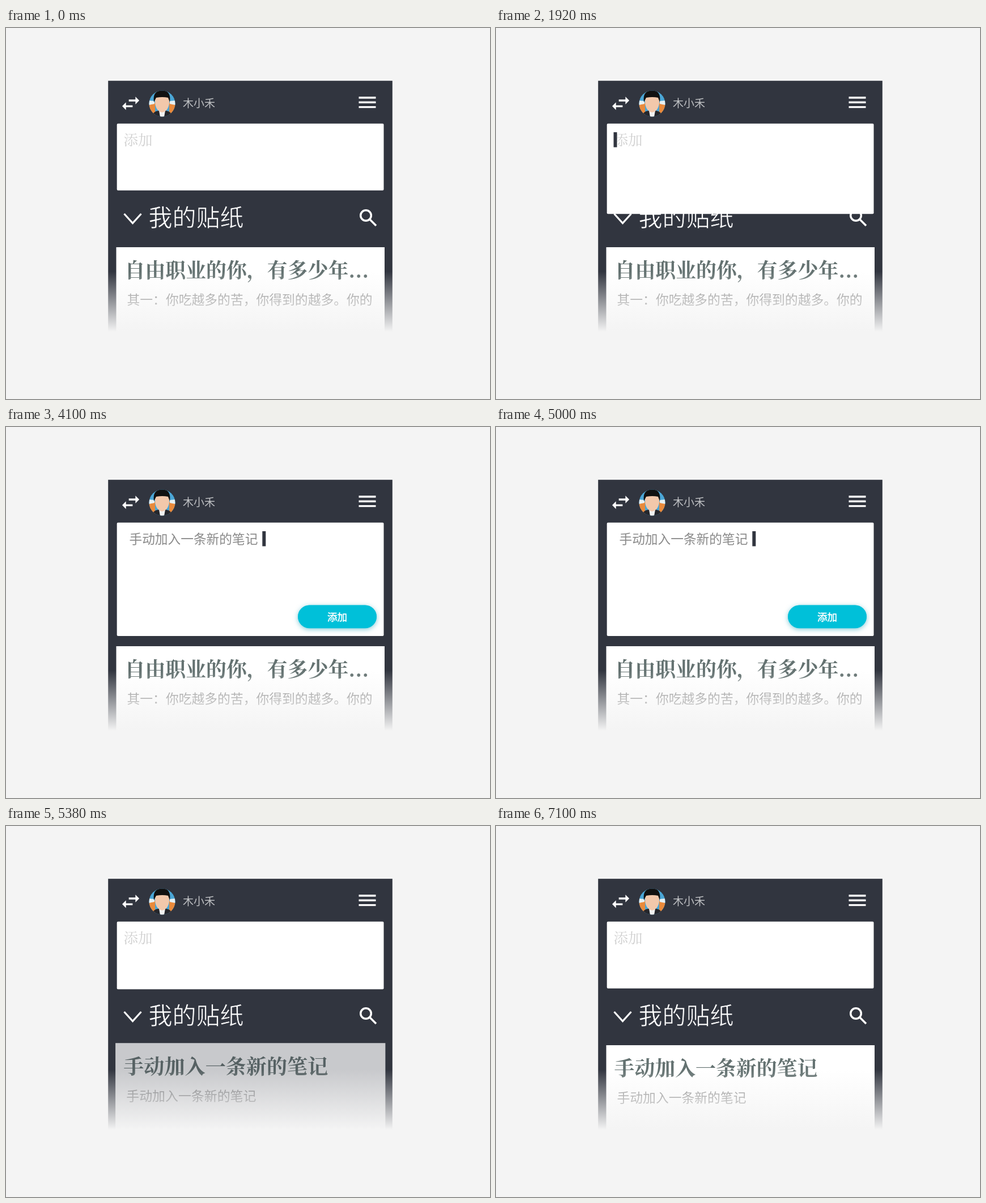
An HTML page for the animation above (7.12 s loop, 854 by 655 pixels).

```html
<!DOCTYPE html>
<html lang="zh-CN">
<head>
<meta charset="utf-8">
<title>添加笔记</title>
<style>
  html, body { margin: 0; width: 100%; height: 100%; overflow: hidden; background: #f4f4f4; }
  svg { display: block; width: 100%; height: 100%; }
  text { font-family: "Noto Sans CJK SC Light", "Noto Sans CJK SC", "Noto Sans CJK", sans-serif; font-weight: 300; }
  .serif { font-family: "Noto Serif CJK SC", "Noto Serif SC", "Noto Serif CJK", "Noto Sans CJK SC", serif; }
  .title { font-size: 35.9px; font-weight: 700; fill: #647271; }
  .body { font-size: 22.8px; fill: #8a8a8a; }
  .icon { fill: none; stroke: #fff; }
  /* outlines in the surface colour thin the strokes, in the text colour thicken them */
  .heading { font-size: 42px; fill: #fff; stroke: #31353f; stroke-width: .7; }
  .label { font-size: 17.5px; fill: #fff; stroke: #fff; stroke-width: .5; text-anchor: middle; }
  #active { filter: drop-shadow(0 2px 4px rgba(0, 150, 175, .5)); }
</style>
</head>
<body>
<svg viewBox="0 0 854 655">
  <defs>
    <linearGradient id="fade" gradientUnits="userSpaceOnUse" x1="0" y1="430" x2="0" y2="536">
      <stop offset="0" stop-color="#f4f4f4" stop-opacity="0"/>
      <stop offset="1" stop-color="#f4f4f4"/>
    </linearGradient>
    <clipPath id="disc"><circle cx="275.5" cy="133.5" r="23"/></clipPath>
  </defs>

  <rect x="180.2" y="93.2" width="501.6" height="450" fill="#31353f"/>

  <!-- header -->
  <path transform="translate(200 113) scale(1.67)" fill="#fff"
    d="M7 11L3 15l4 4v-3h7v-2H7zM21 9l-4-4v3h-7v2h7v3z"/>
  <g clip-path="url(#disc)">
    <rect x="252" y="110" width="47" height="47" fill="#4aa6d6"/>
    <path d="M252 136l11-4v25h-11zM299 136l-11-4v25h11z" fill="#e98a3c"/>
    <path d="M252 128l10 1v5l-10 2zM299 128l-10 1v5l10 2z" fill="#e8f1f4"/>
    <path d="M257 157q2-10 12-11h13q10 1 12 11z" fill="#25262b"/>
    <path d="M270 146h11l-2 11h-7z" fill="#f1f1f1"/>
    <path d="M263 122q0-8 12.5-8t12.5 8v11q-2 14-12.5 16q-10.5-2-12.5-16z" fill="#f2c8ab"/>
    <path d="M261 131q-3-20 14-21q17 0 14 21l-3-8q-10-2-21 0z" fill="#111"/>
  </g>
  <text x="312" y="140.2" font-size="19" fill="#c0c2c5">木小禾</text>
  <path class="icon" stroke-width="3.4" d="M622.5 123h30M622.5 131.3h30M622.5 139.6h30"/>

  <!-- list heading -->
  <path class="icon" stroke-width="3.2" d="M208.5 328L223.5 344.5L238.5 328"/>
  <text class="heading" x="251.5" y="349.5">我的贴纸</text>
  <g class="icon" stroke-width="3.5">
    <circle cx="635" cy="331" r="9.3"/>
    <path d="M641.5 337.5L653 349"/>
  </g>

  <!-- notes -->
  <g id="oldNote">
    <rect x="194.5" y="387" width="473.5" height="160" fill="#fff"/>
    <text class="serif title" x="209.5" y="441">自由职业的你，有多少年...</text>
    <text class="body" x="213.5" y="488">其一：你吃越多的苦，你得到的越多。你的</text>
  </g>
  <g id="newNote">
    <rect x="194.5" y="387" width="473.5" height="160" fill="#fff"/>
    <text class="serif title" x="208.5" y="441">手动加入一条新的笔记</text>
    <text class="body" x="213.5" y="488">手动加入一条新的笔记</text>
  </g>

  <!-- input -->
  <rect id="input" x="195.7" y="168.7" width="470.8" rx="2" fill="#fff"/>
  <text id="hint" class="serif" x="207.5" y="207" font-size="25.5" fill="#d0d0d0">添加</text>
  <text id="typed" x="217.5" y="206" font-size="22.7" fill="#8a8a8a"></text>
  <rect id="cursor" y="184" width="6" height="26.5" fill="#31353f"/>
  <g id="button">
    <rect x="515" y="314.5" width="139" height="40.8" rx="20.4" fill="#8be8f1"/>
    <rect id="active" x="515" y="314.5" width="139" height="40.8" rx="20.4" fill="#00c0d9"/>
    <text class="label" x="584.5" y="342">添加</text>
  </g>

  <rect x="170" y="428" width="524" height="227" fill="url(#fade)"/>
</svg>
<script>
const LOOP = 7120, NOTE = '手动加入一条新的笔记', CHAR = 22.7;
const FOCUS = 1760, EXPAND = 1780, TYPE = 3240, KEY = 70, SEND = 5050, MOVE = 400;

const el = id => document.getElementById(id);
const set = (id, attrs) => {
  for (const name in attrs) el(id).setAttribute(name, attrs[name]);
};
const ramp = (t, start, length) => Math.min(1, Math.max(0, (t - start) / length));

// cubic-bezier(.4, 0, .2, 1)
function ease(x) {
  let lo = 0, hi = 1;
  for (let i = 0; i < 24; i++) {
    const s = (lo + hi) / 2, r = 1 - s;
    if (1.2 * r * r * s + 0.6 * r * s * s + s * s * s < x) lo = s; else hi = s;
  }
  return lo * lo * (3 - 2 * lo);
}

function draw(t) {
  const opened = ease(ramp(t, EXPAND, MOVE));
  const sent = ease(ramp(t, SEND, MOVE));
  const leave = 1 - ramp(t, SEND, 180);
  const count = Math.min(NOTE.length, Math.max(0, Math.floor((t - TYPE) / KEY) + 1));

  set('input', { height: 118 + 82.3 * (opened - sent) });
  set('hint', { opacity: count ? ramp(t, 5140, 160) : 1 });
  el('typed').textContent = NOTE.slice(0, count);
  set('typed', { opacity: 1 - ramp(t, SEND, 260) });
  set('cursor', {
    x: count ? 225.3 + count * CHAR : 207.5,
    opacity: t < FOCUS ? 0 : leave
  });
  set('button', { opacity: ramp(t, 1960, 200) * leave });
  set('active', { opacity: ramp(t, TYPE, 200) });

  const shown = ramp(t, 5150, 315), scale = 1 + 0.022 * (1 - shown);
  set('oldNote', { transform: `translate(0 ${169 * sent})` });
  set('newNote', {
    opacity: shown,
    transform: `translate(431.25 1030) scale(${scale}) translate(-431.25 -1030)`
  });
}

function frame() {
  draw(performance.now() % LOOP);
  requestAnimationFrame(frame);
}
frame();
</script>
</body>
</html>
```
